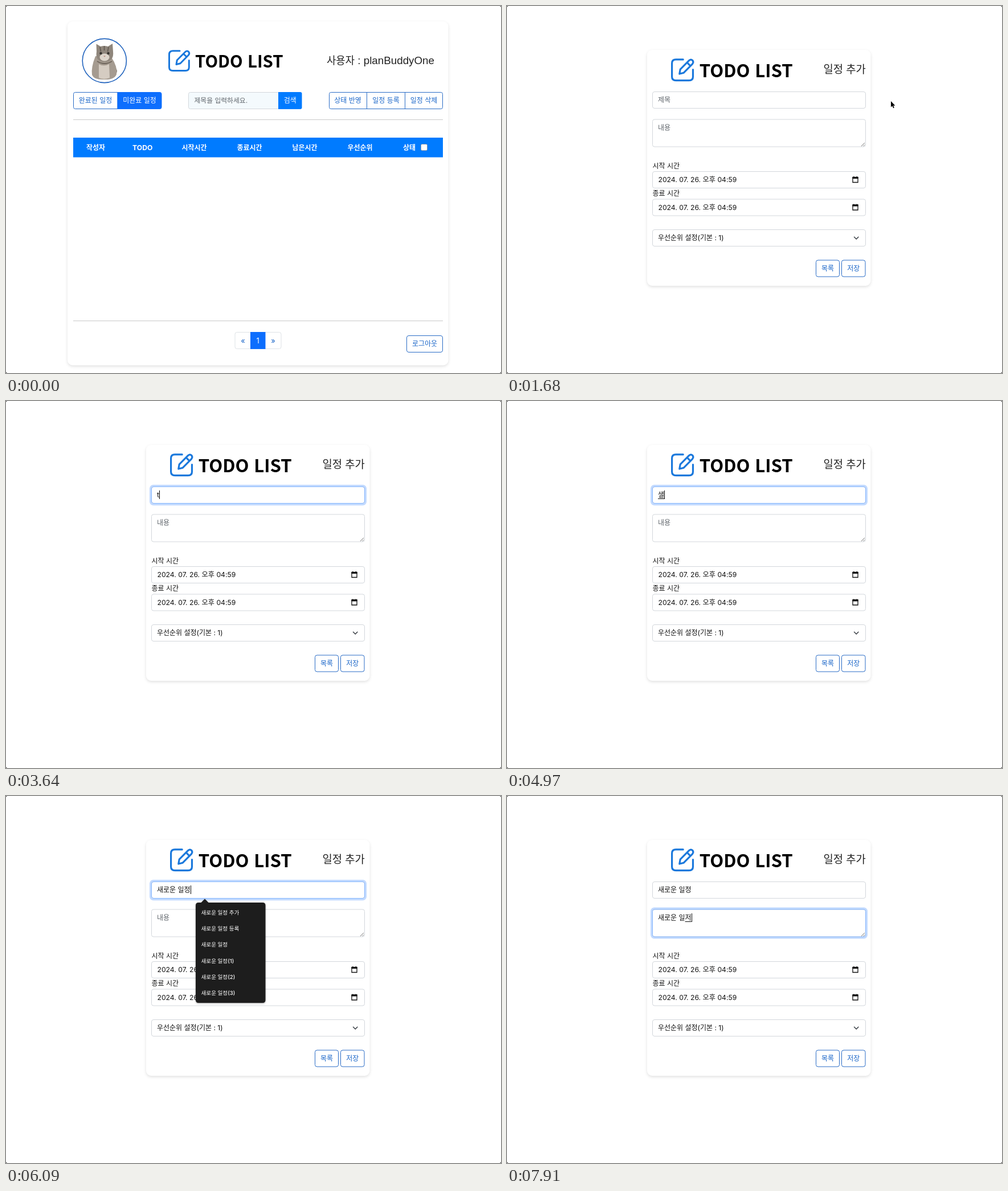
Animation, 869 px wide and 644 px high, one loop 8 s. Source, as an HTML page:

```html
<!DOCTYPE html>
<html lang="ko">
<head>
<meta charset="utf-8">
<title>Todo list</title>
<style>
html, body { margin: 0; width: 100%; height: 100%; overflow: hidden; background: #fff; }
#stage { position: relative; width: 869px; height: 644px; overflow: hidden; }
svg { position: absolute; left: 0; top: 0; display: block; }
svg, .field { font: 12px Inter, "Noto Sans CJK KR", "Noto Sans CJK JP", sans-serif; }
.mid { text-anchor: middle; }
.card { fill: #fff; filter: drop-shadow(0 2.5px 2.5px rgba(0,0,0,.12)); }
.name { font: 700 29.4px "Noto Sans CJK KR", "Noto Sans CJK JP", sans-serif; }
.icon { fill: none; stroke: #1a78dc; stroke-width: 3; stroke-linejoin: round; stroke-linecap: round; }
.line { stroke: #c9c9c9; }
.box { fill: #fff; stroke: #d3d7dc; }
.btn rect, .btn path { fill: #fff; stroke: #2a6cc6; }
.btn text { fill: #1c67c9; text-anchor: middle; }
.btn .on { fill: #0d6efd; stroke: #0d6efd; }
.btn .inv { fill: #fff; }
.head { fill: #fff; font-weight: 700; text-anchor: middle; }
.date { font-size: 12.2px; }
.menu text { fill: #fff; font-size: 9.6px; font-weight: 500; }
.ring { fill: none; stroke: #0d6efd; stroke-opacity: .25; stroke-width: 3.2; }
.edge { fill: none; stroke: #86b7fe; }
.field { position: absolute; left: 265px; height: 16px; line-height: 16px; white-space: pre; color: #111; }
.field.hint { color: #60666c; }
.field u { text-decoration: underline 1px; text-underline-offset: 2px; }
.caret { position: absolute; width: 1px; height: 15px; top: 0; background: #000; }
</style>
</head>
<body>
<div id="stage">
<svg width="869" height="644" viewBox="0 0 869 644">
  <defs>
    <g id="brand">
      <path class="icon" d="M20 1.8H8Q1.5 1.8 1.5 8V30.500Q1.500 36.500 8 36.500H30Q36.300 36.500 36.300 30.500V18.500"/>
      <path class="icon" stroke-width="2.500" d="M14 25.500L15.300 18 30 3.200Q33 .8 35.500 3.200 38 6 35.500 9L21 23.800ZM26.500 6.800L32 12.300"/>
      <text class="name" x="47" y="31.300">TODO LIST</text>
    </g>
    <g id="calendar" fill="#111">
      <path d="M607 300.500h9v9h-9z" fill="none" stroke="#111" stroke-width="1.300"/>
      <path d="M606.500 300h10v3h-10zM608 299h1.500v2H608zM613.500 299h1.500v2h-1.500z"/>
    </g>
  </defs>

  <g id="list">
    <rect class="card" x="108" y="27" width="668.500" height="603.500" rx="9"/>
    <g id="cat">
      <circle cx="172.800" cy="96" r="38.600" fill="#fff" stroke="#1f62bd" stroke-width="1.600"/>
      <path d="M186 122q10-2 9-9l-4-8z" fill="#8d857c"/>
      <path d="M157 88Q149 108 151 121 155 130 172 129 190 130 194 120 196 106 185 90Z" fill="#a59b90"/>
      <path d="M163 102Q172 107 181 102L182 126Q172 130 163 126Z" fill="#d5ccc2"/>
      <path d="M159 80L158.500 66.500 166 71Q172 69 179 71L187 66 188 80Q190 97 173 98 156 97 159 80Z" fill="#8f867c"/>
      <ellipse cx="173" cy="90" rx="8.500" ry="6.500" fill="#ddd5cb"/>
      <path d="M165 72l1.500 8M172.500 70v8M180 72l-1.500 8" stroke="#5f574f" stroke-width="1.500"/>
      <circle cx="166.500" cy="83" r="2.200" fill="#35322d"/>
      <circle cx="179.500" cy="83" r="2.200" fill="#35322d"/>
      <path d="M171 87.500h4l-2 2z" fill="#b07f74"/>
      <path d="M160 97Q173 105 186 97" fill="none" stroke="#6e655c" stroke-width="2"/>
    </g>
    <use href="#brand" x="285" y="77"/>
    <text x="563" y="102" fill="#222" style="font:18.800px 'Liberation Sans','Noto Sans CJK KR',sans-serif"><tspan font-size="17.800">사용자</tspan> : planBuddyOne</text>

    <g class="btn">
      <path d="M196 151.500H121.500q-3 0-3 3V177.500q0 3 3 3H196z"/>
      <path class="on" d="M196 151.500h74q3 0 3 3V177.500q0 3-3 3h-74z"/>
      <text x="157" y="170.300">완료된 일정</text>
      <text class="inv" x="234.500" y="170.300">미완료 일정</text>
      <rect x="567.500" y="151.500" width="199" height="29" rx="3"/>
      <rect id="add" x="633.500" y="151.500" width="67" height="29"/>
      <text x="600" y="170.300">상태 반영</text>
      <text id="addText" x="667" y="170.300">일정 등록</text>
      <text x="733.500" y="170.300">일정 삭제</text>
      <rect x="703.500" y="578.500" width="63" height="29" rx="3.500"/>
      <text x="735" y="597.300">로그아웃</text>
    </g>

    <rect class="box" x="320.500" y="151.500" width="160" height="29" rx="3" style="fill:#f4fafd"/>
    <text x="330.500" y="170.300" fill="#60666c" font-size="11.800">제목을 입력하세요.</text>
    <path d="M478 151h38.500q3 0 3 3v24q0 3-3 3H478z" fill="#007bff"/>
    <text class="mid" x="498.700" y="170.300" fill="#fff">검색</text>

    <path class="line" d="M118 199.500H767M118 552.500H767"/>
    <rect x="118" y="231" width="649" height="34.500" fill="#007bff"/>
    <g class="head">
      <text x="157.500" y="252.500">작성자</text><text x="239.700" y="252.500" font-size="12.200">TODO</text>
      <text x="330.500" y="252.500">시작시간</text><text x="427.500" y="252.500">종료시간</text>
      <text x="524.500" y="252.500">남은시간</text><text x="621.500" y="252.500">우선순위</text>
      <text x="708" y="252.500">상태</text>
    </g>
    <rect x="728.500" y="242.500" width="11" height="11" rx="2" fill="#fff" stroke="#8a9099" stroke-width=".8"/>

    <rect class="box" x="402" y="572.500" width="81" height="29" rx="3.500" style="stroke:#dee2e6"/>
    <rect x="429" y="572" width="26.500" height="30" fill="#0d6efd"/>
    <g class="mid" font-size="13" fill="#1c67c9">
      <text x="416" y="591.500">«</text><text x="442.200" y="591.500" fill="#fff">1</text><text x="469" y="591.500">»</text>
    </g>
  </g>

  <g id="form">
    <rect class="card" x="246" y="77" width="392.500" height="414" rx="9"/>
    <use href="#brand" transform="translate(288 92) scale(1.060)"/>
    <text x="555.500" y="117.500" font-size="18.800" fill="#222">일정 추가</text>
    <g class="box">
      <rect x="255.500" y="150.500" width="374" height="29" rx="3.500"/>
      <rect x="255.500" y="199" width="374" height="48" rx="3.500"/>
      <rect x="255.500" y="290.500" width="374" height="29" rx="3.500"/>
      <rect x="255.500" y="339" width="374" height="29" rx="3.500"/>
      <rect x="255.500" y="392.500" width="374" height="29" rx="3.500"/>
    </g>
    <path d="M622 246l6-6M625.500 246l2.500-2.500" stroke="#666" stroke-width=".9"/>
    <g id="titleRing">
      <rect class="ring" x="253.600" y="148.600" width="377.800" height="33" rx="5"/>
      <rect class="edge" x="255.500" y="150.500" width="374" height="29" rx="3.500"/>
    </g>
    <g id="noteRing">
      <rect class="ring" x="253.600" y="197.200" width="377.800" height="51.600" rx="5"/>
      <rect class="edge" x="255.500" y="199" width="374" height="48" rx="3.500"/>
    </g>
    <g fill="#111">
      <text x="255.500" y="284.500">시작 시간</text>
      <text x="255.500" y="333">종료 시간</text>
      <text class="date" x="265.500" y="309.300">2024. 07. 26. 오후 04:59</text>
      <text class="date" x="265.500" y="357.800">2024. 07. 26. 오후 04:59</text>
      <text x="265" y="411.300">우선순위 설정(기본 : 1)</text>
    </g>
    <use href="#calendar"/>
    <use href="#calendar" y="48.500"/>
    <path d="M609.500 405.200l3.700 3.700 3.700-3.700" fill="none" stroke="#343a40" stroke-width="1.400" stroke-linecap="round"/>
    <g class="btn">
      <rect x="542.500" y="446" width="41" height="29" rx="3.500"/><text x="563" y="464.800">목록</text>
      <rect x="587.500" y="446" width="41.500" height="29" rx="3.500"/><text x="608.300" y="464.800">저장</text>
    </g>
  </g>
</svg>

<div class="field" id="title" style="top:157px"></div>
<div class="field" id="note" style="top:206px"></div>

<svg width="869" height="644" viewBox="0 0 869 644">
  <g id="menu" class="menu">
    <path d="M338 187h4.500l6.500-6.500 6.500 6.500H450.500q5 0 5 5V358q0 5-5 5H338q-5 0-5-5V192q0-5 5-5z" fill="#1d1d1d" style="filter:drop-shadow(0 1px 1.500px rgba(0,0,0,.35))"/>
    <text x="342.500" y="207.500">새로운 일정 추가</text><text x="342.500" y="235.900">새로운 일정 등록</text>
    <text x="342.500" y="264.200">새로운 일정</text><text x="342.500" y="292.600">새로운 일정(1)</text>
    <text x="342.500" y="320.900">새로운 일정(2)</text><text x="342.500" y="349.300">새로운 일정(3)</text>
  </g>
  <g id="pointer" stroke-linejoin="round">
    <path id="arrow" d="M0 0V10.500L2.400 8.300 4.100 12.200 5.800 11.500 4.100 7.700H7.400Z" stroke="#fff" stroke-width="1.400" paint-order="stroke"/>
    <path id="hand" d="M0 1Q1-.5 2 1V5l4.500 1Q8 6.500 7.600 8.500L6.500 13H.5L-3 8.500Q-3.300 7-1.500 7.300L0 8.300Z" fill="#fff" stroke="#000" stroke-width=".9"/>
    <path id="beam" d="M-2.500-7Q0-7 0-5.500 0-7 2.500-7M0-5.500V5.500M-2.500 7Q0 7 0 5.500 0 7 2.500 7" fill="none" stroke="#222"/>
  </g>
  <path d="M0 0h2L0 2zM869 0v2l-2-2zM0 644v-2l2 2zM869 644h-2l2-2z" fill="#555"/>
</svg>
</div>

<script>
const LOOP = 8000, STEP = 70;
const $ = id => document.getElementById(id);

// [time, text]; the part after "|" is still being composed
const titleKeys = [
  [3640, "t"], [3710, "to"], [3850, "tof"], [3920, "tofh"], [4200, "tof"], [4340, "to"],
  [4480, "|ㅅ"], [4550, "|ㅅㅐ"], [4690, "|새"], [4970, "|샐"], [5040, "새|로"], [5180, "새|롱"],
  [5250, "새로|우"], [5320, "새로|운"], [5390, "새로운 "], [5530, "새로운 |ㅇ"], [5600, "새로운 |이"],
  [5670, "새로운 |일"], [5880, "새로운 일|저"], [5950, "새로운 일정"]
];
const noteKeys = [
  [7000, "|ㅅ"], [7070, "|새"], [7140, "|샐"], [7210, "새|로"], [7350, "새|롱"], [7420, "새로|우"],
  [7490, "새로|운"], [7560, "새로운 "], [7630, "새로운 |ㅇ"], [7700, "새로운 |이"],
  [7770, "새로운 |일"], [7910, "새로운 일|저"]
];
const menuSpans = [[3710, 4830], [5040, 5180], [5320, 5530], [5670, 5880], [6090, 6440]];

const within = (t, a, b) => t >= a && t < b;
const ramp = (t, a, b) => Math.min(1, Math.max(0, (t - a) / (b - a)));
const easeOut = p => 1 - (1 - p) * (1 - p);
const easeInOut = p => p * p * (3 - 2 * p);
const show = (id, on) => { $(id).style.display = on ? "" : "none"; };

function drawField(id, keys, hint, t, caret) {
  const key = keys.filter(k => k[0] <= t).pop();
  const [done, open = ""] = key ? key[1].split("|") : [""];
  const mark = caret ? '<i class="caret"></i>' : "";
  const html = key ? `${done}<u>${open}</u>${mark}` : mark + hint;
  const el = $(id);
  el.className = key ? "field" : "field hint";
  if (el.dataset.html !== html) el.innerHTML = el.dataset.html = html;
}

function drawPointer(t, onForm) {
  const up = easeOut(ramp(t, 0, 1260)), left = easeInOut(ramp(t, 1750, 2310));
  const x = 736 - 62 * up - 185 * left, y = 575 - 408 * up - 2 * left;
  const hover = !onForm && y < 181, inside = onForm && x < 630;
  $("pointer").setAttribute("transform", `translate(${x} ${y})`);
  show("pointer", within(t, 70, 3640));
  show("hand", hover);
  show("beam", inside);
  show("arrow", !hover && !inside);
  $("add").classList.toggle("on", hover);
  $("addText").classList.toggle("inv", hover);
}

function draw(now) {
  const t = Math.floor((now % LOOP) / STEP) * STEP;
  const onForm = t >= 1540;
  show("list", !onForm);
  show("form", onForm);
  show("title", onForm);
  show("note", onForm);
  drawField("title", titleKeys, "제목", t, within(t, 2380, 6440) && !within(t, 2800, 3360));
  drawField("note", noteKeys, "내용", t, t >= 6440);
  const swap = ramp(t, 6370, 6580);
  $("titleRing").style.opacity = ramp(t, 2310, 2450) * (1 - swap);
  $("noteRing").style.opacity = swap;
  show("menu", menuSpans.some(([a, b]) => within(t, a, b)));
  drawPointer(t, onForm);
}

function tick() {
  draw(performance.now());
  requestAnimationFrame(tick);
}
tick();
</script>
</body>
</html>
```
